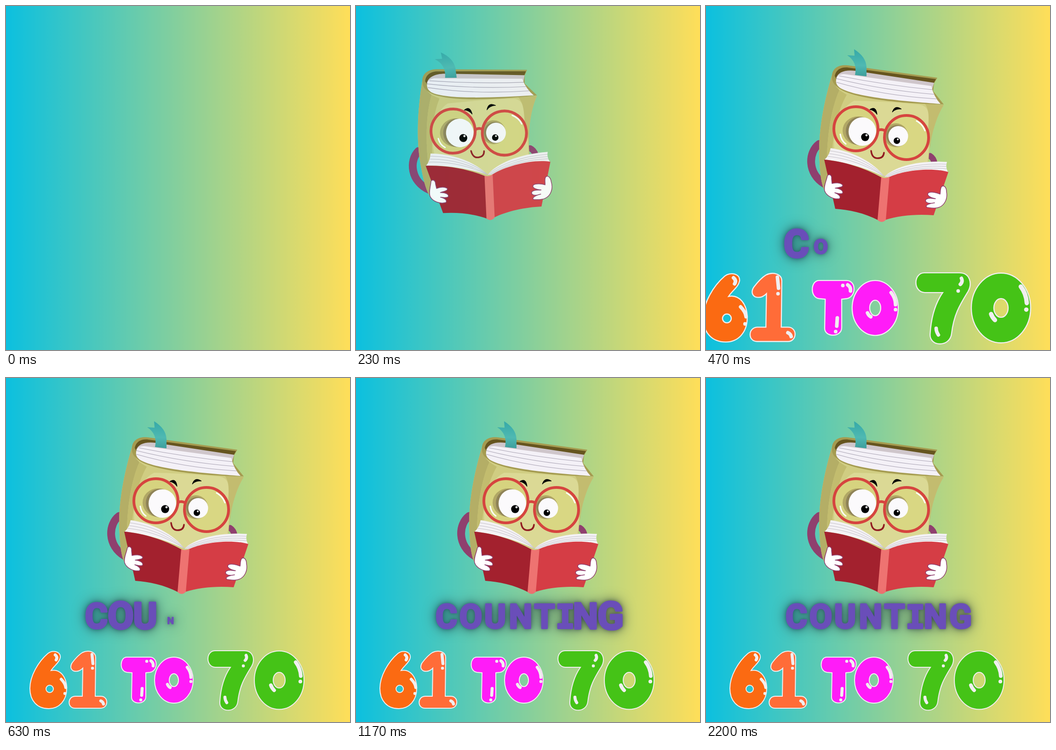
Recreate the animation shown at these times as an HTML page. Size 748 by 748 pixels, loop 5010 ms.

```html
<!DOCTYPE html>
<html lang="en">
<head>
<meta charset="utf-8">
<title>Counting 61 to 70</title>
<style>
  html, body { margin: 0; height: 100%; overflow: hidden; }
  body { background: linear-gradient(90deg, #0cc0df, #ffde59); }
  svg { display: block; width: 100vw; height: 100vh; }
  .line { fill: none; stroke-linecap: round; stroke-linejoin: round; }
  #word { filter: drop-shadow(0 0 4px #1c2b4b88) drop-shadow(0 0 13px #10202899); }
  #word text {
    font: 700 72px Roboto, sans-serif; text-anchor: middle;
    fill: #6a4eb9; stroke: #6a4eb9; stroke-width: 4; stroke-linejoin: round;
  }
  #word .slab { font: 700 70px "DejaVu Sans Mono", monospace; }
  #digits .shape { stroke: #f1eef0; stroke-width: 2; fill-rule: evenodd; }
  #digits .shine { stroke: #f1eef0; stroke-width: 6.5; }
</style>
</head>
<body>
<svg viewBox="0 0 748 748">
  <defs>
    <linearGradient id="ribbon" x2="0" y2="1">
      <stop stop-color="#35a9a8"/><stop offset=".6" stop-color="#4fb9b2"/><stop offset="1" stop-color="#3d9d9c"/>
    </linearGradient>
  </defs>

  <g id="book">
    <!-- arms behind the body -->
    <g class="line" stroke="#8f3f6e">
      <path d="M246 300C222 318 220 364 258 387" stroke-width="17"/>
      <path d="M487 326Q495 331 497 342" stroke-width="13"/>
    </g>

    <!-- cover -->
    <path fill="#d0cd82" d="M274 150C262 190 241 270 247 340Q249 385 258 402L470 420L484 345C484 300 497 245 517 215C440 210 310 195 285 172Q274 165 274 150Z"/>
    <path fill="#b4ae66" d="M274 150C262 190 241 270 247 340Q249 385 258 402L266 400C258 330 265 240 290 183Q276 170 274 150Z"/>
    <path fill="#c2bc6e" d="M290 183C265 240 258 330 266 400L276 400C268 330 276 245 306 193Z"/>
    <path fill="#dbd995" d="M322 206C370 207 430 210 467 215C486 219 487 240 486 268C484 310 484 340 478 350L388 371L280 320C274 280 285 225 322 206Z"/>
    <path fill="#c3bc6f" d="M517 215C500 243 490 280 487 310L483 275C483 250 488 230 476 212Z"/>

    <!-- top edge and pages -->
    <path fill="#a59b50" d="M274 150C276 134 290 127 308 129L503 156L496 168L494 185L517 214C440 213 310 203 283 174Q272 165 274 150Z"/>
    <path fill="#66551f" d="M280 152C283 137 296 132 310 134L500 159L495 168L330 146L284 160Z"/>
    <path fill="#cfc6cb" d="M283 157C287 144 302 138 325 141L496 167L492 180L300 155Z"/>
    <path fill="#f4f1f7" d="M283 160Q285 148 300 148L490 174Q495 197 510 213C430 207 320 198 290 177Q281 170 283 160Z"/>
    <g class="line" stroke="#aaa4b4" stroke-width="1.2">
      <path d="M290 152Q390 172 492 182M284 158Q385 183 496 192M284 166Q385 195 501 202"/>
    </g>
    <path fill="url(#ribbon)" d="M307 107L323 108L322 94Q348 110 349 133L349 153L324 150Q330 122 307 107Z"/>

    <!-- face -->
    <circle cx="325" cy="267" r="47" fill="#d6d37f"/>
    <circle cx="436" cy="286" r="47" fill="#d9d783"/>
    <ellipse cx="331" cy="271" rx="34" ry="31" fill="#b1a765"/>
    <ellipse cx="335" cy="272" rx="31" ry="31" fill="#8f8357"/>
    <ellipse cx="340" cy="273" rx="30" ry="31" fill="#fbfafc"/>
    <ellipse cx="413" cy="281" rx="26" ry="26" fill="#b1a765"/>
    <ellipse cx="415" cy="282" rx="23" ry="23" fill="#8f8357"/>
    <ellipse cx="418" cy="283" rx="21.5" ry="22" fill="#fbfafc"/>
    <circle cx="346" cy="285" r="8.7"/>
    <circle cx="349" cy="281" r="2.4" fill="#fff"/>
    <circle cx="415" cy="293" r="7"/>
    <circle cx="417" cy="290" r="2" fill="#fff"/>
    <g class="line" stroke="#d6443f" stroke-width="6">
      <circle cx="326" cy="267" r="48"/>
      <circle cx="436" cy="286" r="48"/>
      <path d="M375 270Q382 267 389 271"/>
    </g>
    <g class="line" stroke="#fff" stroke-width="3">
      <path d="M292 279Q294 293 304 300M458 250Q471 257 476 271"/>
    </g>
    <path d="M356 225Q370 216 372 236Q366 227 356 225ZM405 231Q410 214 425 224Q412 223 405 231Z" stroke="#000" stroke-linejoin="round"/>
    <path class="line" d="M359 315Q361 331 373 331Q386 331 387 319" stroke="#921c21" stroke-width="3.5"/>

    <!-- the book being read -->
    <path fill="#f4f2f5" d="M271 309C320 316 365 340 388 371C350 353 300 338 258 334Q268 325 271 309Z"/>
    <path fill="#f4f2f5" d="M388 371C410 350 460 335 524 339Q520 350 526 361C480 352 430 358 399 372Z"/>
    <g class="line" stroke="#c3bfc8">
      <path d="M270 315C320 321 365 345 388 371M268 321C318 327 360 348 388 371M265 327C315 332 358 351 388 371"/>
      <path d="M388 371C415 353 465 341 522 344M392 371C420 356 468 345 522 349M396 371C425 358 470 349 523 354"/>
    </g>
    <path fill="#a3212e" d="M257 334C300 338 345 352 382 373L375 466C345 450 310 443 281 441Z"/>
    <path fill="#d53d45" d="M398 372C430 357 490 350 527 361L495 455C460 452 420 455 390 465Z"/>
    <path fill="#ee7371" d="M381 372Q390 377 399 371L391 465Q382 474 373 465Z"/>

    <!-- hands -->
    <g fill="#fff" stroke="#8f3f6e" stroke-width="1.5" stroke-linejoin="round">
      <path d="M264 369C268 364 274 368 273 376L274 386C282 384 292 384 297 389C299 394 290 394 281 396C292 397 299 402 297 407C293 410 287 407 280 406C290 410 294 415 290 419C277 421 262 413 258 402C255 392 262 380 264 369Z"/>
      <path d="M512 393C517 388 523 394 523 404C526 420 518 434 506 438C498 441 490 439 481 438C476 436 479 430 497 428C482 431 474 426 479 420C486 416 492 419 499 419C488 417 478 411 484 406C490 403 502 406 509 409C510 404 509 398 512 393Z"/>
    </g>
  </g>

  <g id="word"></g>

  <g id="digits">
    <g class="shape">
      <path fill="#fb6a12" d="M91 599C101 591 120 594 118 608C116 619 105 625 98 636C118 632 132 650 132 675C132 702 115 719 93 719C68 719 52 702 52 675C52 648 70 617 91 599ZM87 676a8 8 0 1 0 16 0a8 8 0 1 0-16 0Z"/>
      <path fill="#ff6c38" d="M166 597C178 591 195 594 195 608L194 692L206 692C224 692 223 718 206 718L150 718C133 718 133 693 150 692L166 692L167 631C161 637 154 639 147 637C139 633 140 625 144 619C150 611 158 602 166 597Z"/>
      <path fill="#ff1cf8" d="M262 607L313 607C331 607 331 637 313 640L304 641L304 693C304 711 272 711 273 693L274 641L263 640C246 638 247 608 262 607Z"/>
      <path fill="#ff1cf8" d="M323 657a42 50 0 1 0 84 0a42 50 0 1 0-84 0ZM355 657a10 14 0 1 0 20 0a10 14 0 1 0-20 0Z"/>
      <path fill="#45c317" d="M454 593L518 593C538 593 542 613 534 627C520 650 508 668 504 704C501 729 463 728 465 704C467 672 476 646 488 629L455 629C434 628 434 594 454 593Z"/>
      <path fill="#45c317" d="M540 657a54 63.5 0 1 0 108 0a54 63.5 0 1 0-108 0ZM581 657a13 17 0 1 0 26 0a13 17 0 1 0-26 0Z"/>
    </g>
    <g class="line shine">
      <path d="M107 602q6 5 2 11M120 655q9 9 10 18m-2 13h.1"/>
      <path d="M187 601l2 20m-1 10h.1M206 702q5 2 6 7"/>
      <path d="M306 616h.1M315 615q6 4 5 11M296 675l-1 15m-2 10h.1"/>
      <path d="M394 629q8 10 8 22m0 9h.1M351 666q2 5 6 7"/>
      <path d="M522 603q3 6-2 11m-4 12h.1M476 694q0 6 4 12"/>
      <path stroke-width="8" d="M630 618q10 13 11 30m-1 12h.1M576 668q2 6 7 11"/>
    </g>
  </g>
</svg>

<script>
const LOOP = 5010;
const get = id => document.getElementById(id);
const clamp = v => Math.max(0, Math.min(1, v));
const book = get("book"), digits = get("digits"), word = get("word");

const centers = [196.5, 249.5, 302.5, 358, 410, 455, 499, 553.5];
const letters = [..."COUNTING"].map(char => {
  const text = document.createElementNS("http://www.w3.org/2000/svg", "text");
  text.textContent = char;
  text.setAttribute("y", 12.5);
  if (char === "I") text.setAttribute("class", "slab");
  return word.appendChild(text);
});

// Grow past full size, then settle back.
function pop(u) {
  if (u <= 0) return 0;
  if (u < 150) return 1.17 * Math.sin(Math.PI / 2 * u / 150);
  const p = clamp((u - 150) / 250);
  return 1 + 0.17 * (1 + Math.cos(Math.PI * p)) / 2;
}

function draw(t) {
  const roll = clamp((t - 60) / 390);
  const left = (1 - roll) ** 3;
  book.setAttribute("transform", `translate(${-640 * left} ${-7 * left}) rotate(${-42.6 * left} 372 282)`);
  book.setAttribute("opacity", t < 70 ? 0 : clamp(roll * 2.12));

  const drop = clamp((t - 410) / 215);
  const size = 1 + 0.3 * (1 - drop) ** 1.3;
  digits.setAttribute("transform", `translate(350 659) scale(${size}) translate(-350 -659)`);
  digits.setAttribute("opacity", clamp((t - 410) / 50));

  letters.forEach((letter, i) => {
    const scale = pop(t - 322 - 95 * i);
    letter.setAttribute("transform", `translate(${centers[i]} 531) scale(${scale})`);
    letter.setAttribute("visibility", scale ? "visible" : "hidden");
  });
}

const start = performance.now();
function tick() {
  draw((performance.now() - start) % LOOP);
  requestAnimationFrame(tick);
}
tick();
</script>
</body>
</html>
```
